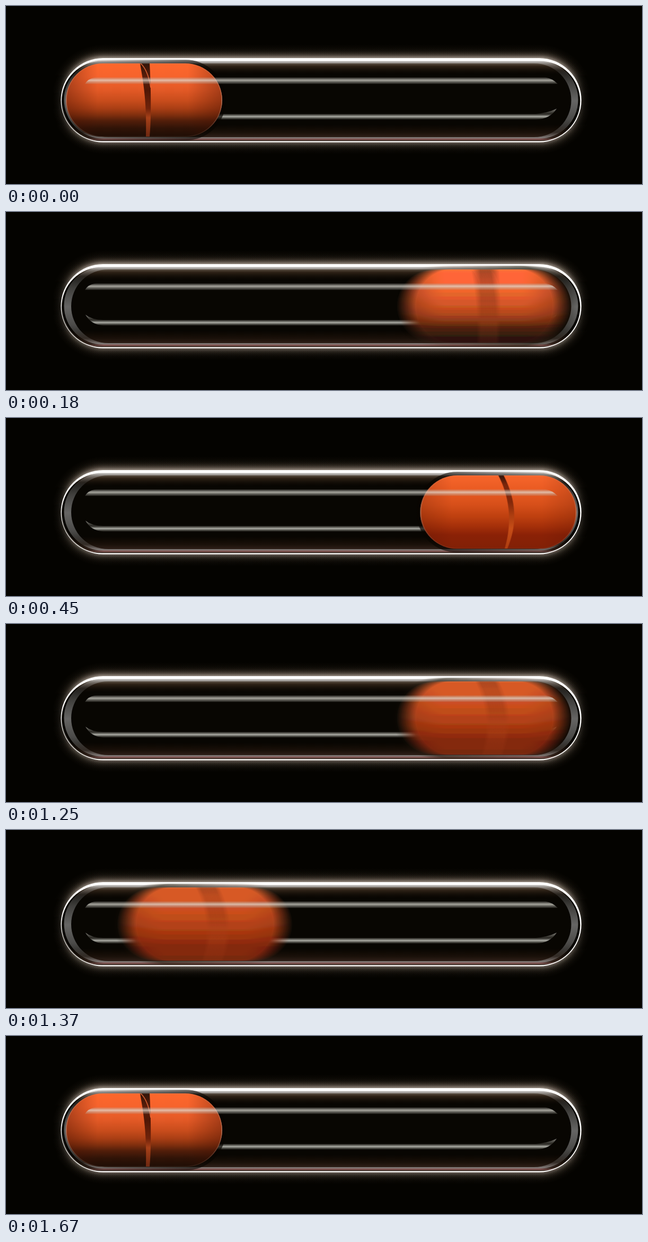
An HTML page with a canvas for the animation above (2.47 s loop, 1200 px wide and 338 px high).

```html
<!DOCTYPE html>
<html lang="en">
<head>
<meta charset="utf-8">
<title>Capsule switch</title>
<style>
  html, body { margin: 0; height: 100%; overflow: hidden; background: #040300; }
  canvas { display: block; width: 100vw; height: 100vh; }
</style>
</head>
<body>
<canvas id="stage" width="1200" height="338"></canvas>
<script>
const W = 1200, H = 338, LOOP = 2470, STEP = 30;
const LEFT = 113, RIGHT = 781.5, PILL_W = 295, TOP = 109, PILL_H = 139.5;
const out = document.getElementById('stage').getContext('2d');

function layer(draw) {
  const canvas = document.createElement('canvas');
  canvas.width = W;
  canvas.height = H;
  const c = canvas.getContext('2d');
  if (draw) draw(c);
  return canvas;
}

// Linear gradient from [position, colour] pairs, vertical unless told otherwise.
function ramp(c, stops, horizontal) {
  const a = stops[0][0], b = stops[stops.length - 1][0];
  const g = horizontal ? c.createLinearGradient(a, 0, b, 0) : c.createLinearGradient(0, a, 0, b);
  for (const [p, colour] of stops) g.addColorStop((p - a) / (b - a), colour);
  return g;
}

function stadium(c, x0, y0, x1, y1) {
  c.roundRect(x0, y0, x1 - x0, y1 - y0, (y1 - y0) / 2);
}

function ring(c, outer, inner, fill) {
  c.beginPath();
  stadium(c, ...outer);
  stadium(c, ...inner);
  c.fillStyle = fill;
  c.fill('evenodd');
}

const grey = a => `rgba(190,192,196,${a})`;

const tube = layer(c => {
  // outer glow: wide faint strokes under narrow bright ones
  for (let r = 26; r > 0; r--) {
    const a = .16 * Math.exp(-r / 6);
    const tint = k => `rgba(${240 - r},${232 - 2.5 * r},${228 - 4 * r},${a * k})`;
    c.strokeStyle = ramp(c, [[98, tint(1)], [115, tint(.8)], [150, tint(.3)], [180, tint(.18)],
      [210, tint(.3)], [240, tint(.6)], [259, tint(.65)]]);
    c.lineWidth = 2 * r;
    c.beginPath();
    stadium(c, 105, 99, 1085, 258);
    c.stroke();
  }

  // hollow interior
  c.save();
  c.beginPath();
  stadium(c, 106, 101, 1084, 257);
  c.clip();
  c.fillStyle = '#040302';
  c.fillRect(0, 0, W, H);
  c.fillStyle = ramp(c, [[104, 'rgba(190,180,172,.9)'], [109, 'rgba(125,112,100,.7)'], [114, 'rgba(70,52,38,.6)'],
    [130, 'rgba(20,10,5,0)'], [225, 'rgba(30,15,8,0)'], [240, 'rgba(34,20,14,.6)'], [252, 'rgba(70,48,42,.7)']]);
  c.fillRect(106, 100, 978, 160);
  c.restore();

  ring(c, [109.5, 104, 1079.5, 252], [123, 109, 1066.5, 249],
    ramp(c, [[104, grey(.85)], [110, grey(.4)], [122, grey(.12)], [145, grey(.3)], [180, grey(.5)],
      [215, grey(.36)], [240, grey(.15)], [252, grey(.6)]]));

  c.fillStyle = ramp(c, [[150, 'rgba(125,82,82,0)'], [185, '#7d5252'], [1008, '#7d5252'], [1045, 'rgba(125,82,82,0)']], true);
  c.fillRect(150, 251.5, 895, 3);

  ring(c, [103.5, 99, 1085.7, 258.7], [104.9, 104.5, 1083.3, 256.6], '#fff');

  // lower reflection
  c.fillStyle = ramp(c, [[195, 'rgba(190,190,185,.7)'], [205, 'rgba(110,110,106,.3)'],
    [210, '#adaeaa'], [216, 'rgba(80,80,76,.2)']]);
  c.beginPath();
  c.moveTo(150, 195);
  c.quadraticCurveTo(162, 205, 184, 205);
  c.lineTo(1000, 205);
  c.quadraticCurveTo(1022, 203, 1039, 195);
  c.quadraticCurveTo(1026, 215, 1000, 215.5);
  c.lineTo(184, 215.5);
  c.quadraticCurveTo(160, 214, 150, 195);
  c.fill();
});

const gloss = layer(c => {
  c.fillStyle = ramp(c, [[135, 'rgba(170,170,165,.12)'], [141, 'rgba(222,222,216,.74)'], [148, 'rgba(170,170,165,.15)']]);
  c.beginPath();
  c.moveTo(149, 148);
  c.quadraticCurveTo(156, 136, 172, 135.5);
  c.lineTo(1018, 135.5);
  c.quadraticCurveTo(1032, 138, 1041, 148);
  c.closePath();
  c.fill();
});

// Both capsules are drawn at the left resting place; the shadow falls on the open side.
function pill(body, ends, openRight, seam) {
  return layer(c => {
    const x1 = LEFT + PILL_W, bottom = TOP + PILL_H;
    const shade = on => `rgba(4,2,1,${on ? .7 : 0})`;
    c.beginPath();
    stadium(c, LEFT, TOP, x1, bottom);
    c.lineWidth = 14;
    c.strokeStyle = ramp(c, [[LEFT, shade(!openRight)], [x1, shade(openRight)]], true);
    c.stroke();
    c.clip();
    c.fillStyle = ramp(c, body);
    c.fillRect(LEFT, TOP, PILL_W, PILL_H);
    c.fillStyle = ramp(c, [[LEFT, `rgba(60,10,0,${ends})`], [LEFT + 60, 'rgba(60,10,0,0)'],
      [x1 - 65, 'rgba(60,10,0,0)'], [x1, `rgba(60,10,0,${ends})`]], true);
    c.fillRect(LEFT, TOP, PILL_W, PILL_H);
    seam(c);
    c.beginPath();
    stadium(c, LEFT, TOP, x1, bottom);
    c.lineWidth = 3;
    c.strokeStyle = ramp(c, [[TOP, 'rgba(200,160,145,.1)'], [180, 'rgba(210,180,168,.5)'], [bottom, 'rgba(150,110,95,.15)']]);
    c.stroke();
  });
}

const litPill = pill(
  [[109, '#f9642c'], [135, '#f2602c'], [160, '#de5626'], [180, '#c4491c'], [195, '#a53b14'],
   [207, '#7c2c0e'], [218, '#4e1b0a'], [232, '#2c1007'], [249, '#1a0a05']], .38, true,
  c => {
    c.fillStyle = ramp(c, [[109, '#2c1109'], [135, '#571b0a'], [160, '#4a1406'], [195, '#6d200a'], [212, '#a23d18'], [248, '#6a2510']]);
    c.beginPath();
    c.moveTo(253, 109);
    c.bezierCurveTo(257, 135, 266, 175, 264, 248);
    c.lineTo(271, 248);
    c.bezierCurveTo(274, 220, 274, 160, 271, 109);
    c.fill();
    c.strokeStyle = 'rgba(250,110,60,.8)';
    c.lineWidth = 1.6;
    c.beginPath();
    c.moveTo(254, 109);
    c.quadraticCurveTo(268, 122, 273, 155);
    c.stroke();
  });

const redPill = pill(
  [[109, '#f2622b'], [135, '#e65822'], [165, '#d24c19'], [188, '#b93c0f'], [206, '#a02c09'],
   [222, '#861e06'], [249, '#7d1d06']], .2, false,
  c => {
    c.translate(LEFT - RIGHT, 0);
    c.fillStyle = ramp(c, [[109, '#2a100a'], [126, '#74220b'], [160, '#7e250a'], [185, '#a83a10'], [210, '#c24a17'], [248, '#a93a10']]);
    c.beginPath();
    c.moveTo(929, 109);
    c.bezierCurveTo(948, 145, 957, 195, 941, 248);
    c.lineTo(946, 248);
    c.bezierCurveTo(964, 205, 965, 160, 939, 109);
    c.fill();
    c.translate(RIGHT - LEFT, 0);
  });

// Average of shifted copies across x - half .. x + half.
function smear(c, image, x, half) {
  const n = half < .5 ? 1 : 14;
  c.save();
  c.globalCompositeOperation = 'lighter';
  c.globalAlpha = 1 / n;
  for (let i = 0; i < n; i++) c.drawImage(image, x + (n > 1 ? half * (2 * i / (n - 1) - 1) : 0), 0);
  c.restore();
}

const capsule = layer(), scene = layer();
const capsuleCtx = capsule.getContext('2d'), sceneCtx = scene.getContext('2d');
const HIT = 7, KICKS = [22, -30, -5, 10, -4, 2];
const kick = step => KICKS[step - HIT] || 0;

function glide(u) {
  const smooth = u * u * (3 - 2 * u);
  const smoother = u * u * u * (10 - 15 * u + 6 * u * u);
  return (smooth + smoother) / 2;
}

function render(t) {
  const back = t >= 1250;
  const step = Math.max(0, Math.floor((t - (back ? 1250 : 30)) / STEP) + 1);
  const moving = step > 0 && step < HIT;
  const progress = glide(Math.min(step / HIT, 1));
  const travel = (RIGHT - LEFT) * (back ? 1 - progress : progress);
  const atRight = back ? step < HIT : step >= HIT;

  capsuleCtx.globalCompositeOperation = 'source-over';
  capsuleCtx.clearRect(0, 0, W, H);
  smear(capsuleCtx, atRight ? redPill : litPill, travel, moving ? 17 : 0);
  if (moving && back) {
    capsuleCtx.globalCompositeOperation = 'source-atop';
    capsuleCtx.fillStyle = 'rgba(60,12,4,.15)';
    capsuleCtx.fillRect(0, 0, W, H);
  }

  sceneCtx.clearRect(0, 0, W, H);
  for (const part of [tube, capsule, gloss]) sceneCtx.drawImage(part, 0, 0);

  const force = back ? -.35 : 1;
  out.fillStyle = '#040300';
  out.fillRect(0, 0, W, H);
  const spread = step >= HIT ? Math.abs(kick(step + 1) - kick(step - 1)) * .27 : 0;
  smear(out, scene, force * kick(step), Math.abs(force) * spread);
}

function tick() {
  render(performance.now() % LOOP);
  requestAnimationFrame(tick);
}
tick();
</script>
</body>
</html>
```
